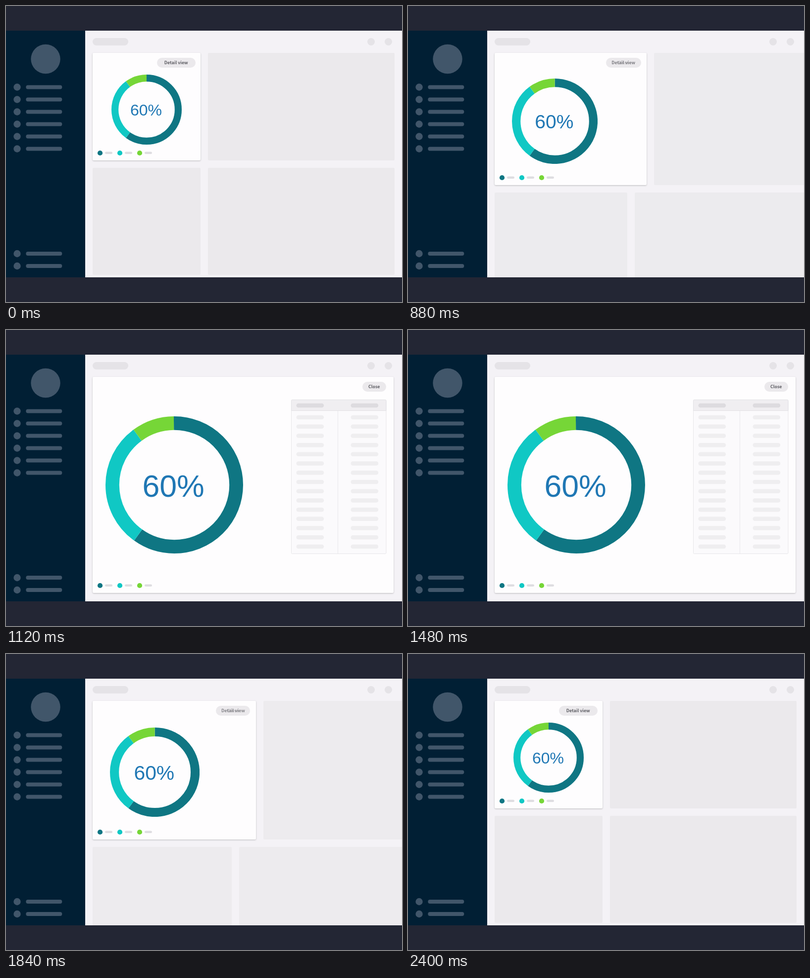
An HTML page for the animation above (2.52 s loop, 800 px wide and 600 px high).

```html
<!DOCTYPE html>
<html lang="en">
<head>
<meta charset="utf-8">
<title>Dashboard card</title>
<style>
  html, body { margin: 0; width: 100%; height: 100%; overflow: hidden; background: #232634; }
  #stage {
    --p: 0;                                   /* 0 = small card, 1 = detail view */
    --q: calc(1 - var(--p));
    --w: calc(217.5px + 390px * var(--p));
    --h: calc(217.5px + 220px * var(--p));
    position: absolute; left: 0; top: 0; width: 800px; height: 600px; overflow: hidden;
  }
  #stage div, #stage svg, #stage span { position: absolute; }
  #app { left: 0; top: 50px; width: 800px; height: 500px; overflow: hidden; background: #f4f2f6; }
  #side { left: 0; top: 0; width: 160px; height: 500px; background: #011f34; }
  #side svg { left: 0; top: 0; fill: #41566a; }
  .tone { background: #e5e3e7; border-radius: 8px; height: 15px; top: 15px; }

  .panel { background: #ebe9ec; border-radius: 2px; opacity: var(--q); }
  .top { left: calc(190px + var(--w)); top: 45px; width: 377.5px; height: var(--h); }
  .low { top: calc(60px + var(--h)); height: var(--h); }
  .low.a { left: 175px; width: var(--h); }
  .low.b { left: calc(190px + var(--h)); width: 377.5px; }

  #card {
    left: 175px; top: 45px; width: var(--w); height: var(--h);
    background: #fefdfe; border-radius: 2px; box-shadow: 0 1px 3px rgba(0, 0, 0, .24);
  }
  #clip { inset: 0; overflow: hidden; border-radius: 2px; }
  #donut {
    --r: calc(71px + 68px * var(--p));
    left: calc(109px + 56px * var(--p) - var(--r));
    top: calc(114.5px + 104.2px * var(--p) - var(--r));
    width: calc(2 * var(--r)); height: calc(2 * var(--r));
  }
  #donut circle { fill: none; stroke-width: 14.2; }
  #donut text { font: 32px "Liberation Sans", Arial, sans-serif; fill: #1f77b4; text-anchor: middle; }
  #legend { left: 0; bottom: 5px; }
  #button {
    top: 10px; right: calc(10px + 5px * var(--p));
    width: calc(47.5px + 30px * var(--q)); height: 20px;
    border-radius: 10px; background: #ebe9ec;
  }
  #button span {
    left: 50%; top: 0; transform: translateX(-50%); white-space: nowrap;
    font: bold 8.8px/19px "Noto Sans CJK SC", "Noto Sans CJK JP", "Noto Sans", sans-serif; color: #5d5d63;
  }
  #open { opacity: var(--q); }
  #close { opacity: var(--p); }
  #table {
    left: calc(400.5px - 60.5px * var(--q)); top: calc(46px - 44px * var(--q));
    transform-origin: 0 0; transform: scale(calc(1 - .305 * var(--q)));
    opacity: var(--p);
  }
</style>
</head>
<body>
<div id="stage">
  <div id="app">
    <div id="side"><svg id="menu" width="160" height="500"><circle cx="80" cy="57.5" r="29.7"/></svg></div>
    <div class="tone" style="left:175px;width:72px"></div>
    <div class="tone" style="left:730px;width:15px"></div>
    <div class="tone" style="left:765px;width:15px"></div>
    <div class="panel top"></div>
    <div class="panel low a"></div>
    <div class="panel low b"></div>
    <div id="card">
      <div id="clip">
        <svg id="donut" viewBox="-71 -71 142 142"><text x="-1" y="12.2">60%</text></svg>
        <svg id="legend" width="140" height="20"></svg>
        <svg id="table" width="193" height="313">
          <rect x=".5" y=".5" width="191.5" height="312" rx="2" fill="#fbfafc" stroke="#e7e6e9"/>
          <path d="M.5 22.5V2.5q0-2 2-2H190q2 0 2 2v20z" fill="#f0eef1" stroke="#e2e1e4"/>
          <path d="M94.5 23V312" stroke="#e9e8eb"/>
        </svg>
        <div id="button"><span id="open">Detail view</span><span id="close">Close</span></div>
      </div>
    </div>
  </div>
</div>
<script>
  const $ = id => document.getElementById(id);

  function add(parent, tag, attrs) {
    const el = document.createElementNS("http://www.w3.org/2000/svg", tag);
    for (const key in attrs) el.setAttribute(key, attrs[key]);
    parent.append(el);
  }
  function bar(parent, x, cy, width, height, fill) {
    const attrs = { x, y: cy - height / 2, width, height, rx: height / 2 };
    if (fill) attrs.fill = fill;
    add(parent, "rect", attrs);
  }

  for (const y of [114.5, 139.5, 164.5, 189.5, 214.5, 239.5, 452, 477]) {
    add($("menu"), "circle", { cx: 22.5, cy: y, r: 7.2 });
    bar($("menu"), 40.3, y, 73, 8);
  }

  const parts = [["#0f7683", 60], ["#10c8c4", 30], ["#76d637", 10]];
  let sum = 0;
  parts.forEach(([color, share], i) => {
    add($("donut"), "circle", {
      r: 63.9, stroke: color, pathLength: 100, transform: "rotate(-90)",
      "stroke-dasharray": `${share} ${100 - share}`, "stroke-dashoffset": -sum
    });
    sum += share;
    add($("legend"), "circle", { cx: 15 + 40 * i, cy: 10, r: 5.1, fill: color });
    bar($("legend"), 25 + 40 * i, 9.7, 15, 4.5, "#dedde1");
  });

  for (const x of [10.5, 120.5]) {
    bar($("table"), x, 12, 55.7, 8.5, "#dddbdf");
    for (let i = 0; i < 15; i++) bar($("table"), x, 36 + 18.714 * i, 55.7, 8.5, "#efeef0");
  }

  // cubic-bezier(.4, 0, .2, 1)
  function ease(x) {
    if (x <= 0) return 0;
    if (x >= 1) return 1;
    let lo = 0, hi = 1;
    for (let i = 0; i < 30; i++) {
      const s = (lo + hi) / 2, r = 1 - s;
      if (1.2 * s * r * r + .6 * s * s * r + s * s * s < x) lo = s; else hi = s;
    }
    return lo * lo * (3 - 2 * lo);
  }

  const LOOP = 2520, STEP = 40;
  let start;
  function draw(now) {
    start ??= now;
    const t = Math.floor((now - start) % LOOP / STEP) * STEP;
    const p = ease((t - 806) / 300) - ease((t - 1658) / 400);
    $("stage").style.setProperty("--p", p.toFixed(5));
    requestAnimationFrame(draw);
  }
  requestAnimationFrame(draw);
</script>
</body>
</html>
```
